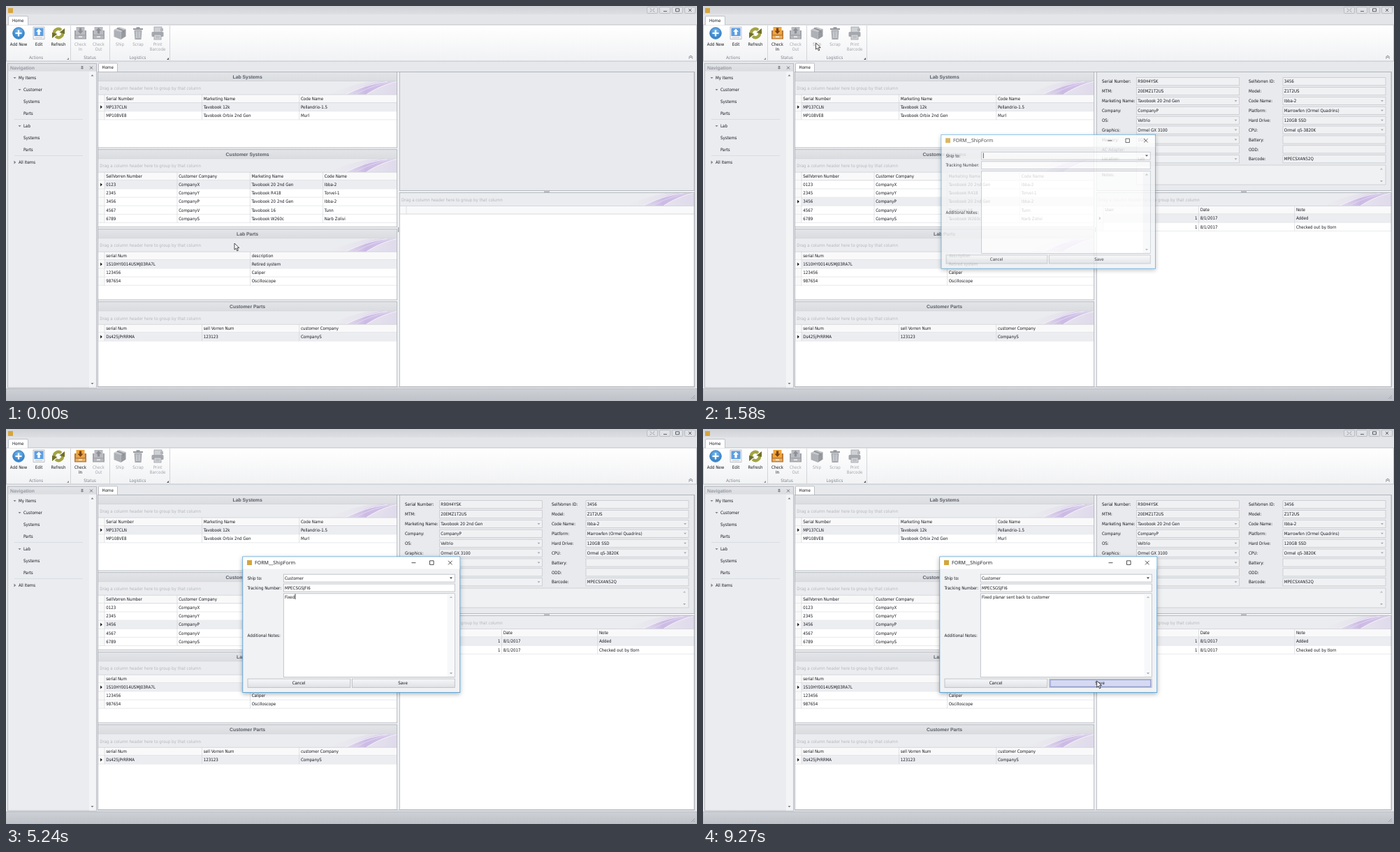
Recreate the animation shown at these times as an HTML page. Size 989x566 px, loop 9.33 s.

```html
<!DOCTYPE html>
<html lang="en">
<head>
<meta charset="utf-8">
<title>Inventory desk</title>
<style>
html, body { margin: 0; width: 100%; height: 100%; overflow: hidden; background: #e6e8ec; }
svg { display: block; width: 100%; height: 100%; }
text { font: 6.15px "DejaVu Sans Condensed", "Liberation Sans", Arial, sans-serif; fill: #16181f; white-space: pre; text-rendering: geometricPrecision; }
.b { font: bold 6.85px "Liberation Sans", Arial, sans-serif; fill: #585c66; }
.faint { fill: #969ba4; }
.dim { fill: #b4b7bd; }
.cap { fill: #7f848d; }
.off { fill: #a3a6ac; }
.mid { text-anchor: middle; }
.end { text-anchor: end; }
.win { font: 7.1px "Open Sans", "Noto Sans", sans-serif; }
</style>
</head>
<body>
<svg id="stage" viewBox="0 0 989 566" preserveAspectRatio="none">
<defs>
  <linearGradient id="bar" x2="0" y2="1"><stop stop-color="#cfd1d6"/><stop offset="1" stop-color="#dddfe3"/></linearGradient>
  <linearGradient id="foot" x2="0" y2="1"><stop stop-color="#cdd0d5"/><stop offset="1" stop-color="#bfc2c8"/></linearGradient>
  <linearGradient id="rib" x2="0" y2="1"><stop stop-color="#fff"/><stop offset="1" stop-color="#f1f2f4"/></linearGradient>
  <linearGradient id="head" x2="0" y2="1"><stop stop-color="#e3e4e8"/><stop offset="1" stop-color="#dadce0"/></linearGradient>
  <linearGradient id="btn" x2="0" y2="1"><stop stop-color="#f6f7f8"/><stop offset="1" stop-color="#dfe1e5"/></linearGradient>
  <linearGradient id="mist"><stop stop-color="#ded6ea" stop-opacity="0"/><stop offset="1" stop-color="#dcd4ea"/></linearGradient>
  <linearGradient id="wisp"><stop stop-color="#d9cdea" stop-opacity=".4"/><stop offset=".4" stop-color="#cbbae4"/><stop offset="1" stop-color="#d5cae8"/></linearGradient>
  <radialGradient id="ball" cy=".35"><stop stop-color="#7fc0f2"/><stop offset="1" stop-color="#3b86cb"/></radialGradient>
  <g id="swirl">
    <path d="M-98 18.5C-80 11-62 4-40 0H0V18.5Z" fill="url(#mist)" opacity=".75"/>
    <path d="M-74 18.5C-58 11-44 4-22 0H0C-18 4-32 11-44 18.5Z" fill="url(#wisp)"/>
    <path d="M-74 18.5C-56 10-38 3-14 0M-44 18.5C-32 11-18 4 0 0" fill="none" stroke="#f6f3fa" stroke-width="1"/>
    <path d="M-60 18.5C-46 11-30 4-6 0" fill="none" stroke="#e6def2" stroke-width=".8"/>
  </g>
  <filter id="shade" x="-10%" y="-10%" width="120%" height="125%"><feDropShadow dx="0" dy="2" stdDeviation="3" flood-opacity=".3"/></filter>
</defs>
</svg>
<script>
const LOOP = 9330, ROW = 12.15, EDGE = '#a9adb4';
const stage = document.getElementById('stage');
const $ = id => document.getElementById(id);

// drawing helpers; text is placed by its vertical centre
const text = (x, y, s, c = '', id = '') => `<text x="${x}" y="${y + 2.2}" class="${c}" id="${id}">${s}</text>`;
const box = (x, y, r, b, fill, line = 'none', more = '') =>
  `<rect x="${x}" y="${y}" width="${r - x}" height="${b - y}" fill="${fill}" stroke="${line}" stroke-width=".8" ${more}/>`;
const path = (d, line = '#888c94', w = .7, fill = 'none') => `<path d="${d}" stroke="${line}" stroke-width="${w}" fill="${fill}"/>`;
const solid = (d, fill) => path(d, 'none', 0, fill);
const layer = (id, s, more = '') => `<g id="${id}" ${more}>${s}</g>`;
const down = (x, y, c = '#a5a9b0') => solid(`M${x - 2} ${y - 1}h4l-2 2.2z`, c);
const up = (x, y, c = '#b5b9bf') => solid(`M${x - 2} ${y + 1}h4l-2-2.2z`, c);
const right = (x, y, c = '#111') => solid(`M${x - 1} ${y - 2.5}v5l2.7-2.5z`, c);

function windowFrame() {
  let s = box(0, 0, 989, 12, 'url(#bar)') + box(3, 3, 10, 10, '#d4a63c') + box(0, 12, 989, 27, '#e3e5e9');
  [917.5, 935.5, 953.5, 971.5].forEach(x => s += box(x, 1.5, x + 15, 10.5, '#dfe1e5', '#b4b7bd', 'rx="1.5"'));
  s += path('M922 3.5l2 2M928 3.5l-2 2M922 8.5l2-2M928 8.5l-2-2', '#5b6068');
  s += path('M941 7.6h5M958.5 3.8h5v4h-5zM977 3.8l4 4.2M981 3.8l-4 4.2', '#4c515a', .9);
  s += box(.5, 27, 988.5, 79, 'url(#rib)', '#b3b6bc');
  s += path('M3.5 27.2V16q0-1.5 1.5-1.5h25q1.5 0 1.5 1.5v11.2', '#b3b6bc', .8, '#fff') + text(9, 20.8, 'Home');
  s += path('M92.5 28v50M148.5 28v50M234.5 28v50', '#c9ccd1', .8);
  s += text(43, 74, 'Actions', 'cap mid') + text(120, 74, 'Status', 'cap mid') + text(188.5, 74, 'Logistics', 'cap mid');
  s += solid('M90 74v3h-3z', '#8a8e96') + solid('M233 74v3h-3z', '#4c515a');
  s += path('M977 73.5l3-2.5 3 2.5M977 75.5l3-2.5 3 2.5', '#6c717a', .8);
  s += box(0, 548.5, 989, 566, 'url(#foot)', '#b3b6bc');
  return s + path('M981 563l5-5M984 563l2-2', '#8f939b');
}

// ribbon pictures, drawn around 0,0
const pics = {
  add: () => '<circle r="8.3" fill="url(#ball)" stroke="#3a7fc0" stroke-width=".9"/>' + path('M-4.5 0h9M0-4.5v9', '#fff', 2.2),
  edit: () => box(-8, -9, 8, 8.5, '#f2f3f5', '#b4b8be') + box(-6.5, -7.5, 6.5, 4, '#5b9ee2') + solid('M0-6.5l4 4.3h-2.3v4.7h-3.4v-4.7h-2.3z', '#fff') +
    path('M-5 6.2H5', '#c3c7cd', 1),
  refresh: () => path('M-6 1A6 6 0 0 1 4-4.5M6-1A6 6 0 0 1-4 4.5', '#a3a443', 4.2) + solid('M1.5-1l7.5-6v8zM-1.5 1L-9 7v-8z', '#6f7128'),
  tray: (on, out) => box(-6, -9, 6, 2, on ? '#f0a53a' : '#b9bbc0') + solid('M-8.5-4h2.5V2h12v-6h2.5V8.5h-17z', on ? '#b8793a' : '#a1a4aa') +
    box(-7, 3.5, 7, 7.2, on ? '#e9b263' : '#b7b9be') + path('M-2.5 5.2h5', '#f7f4ee', 1.4) +
    solid(out ? 'M0-8l4 4.5h-2.4v4h-3.2v-4h-2.4z' : 'M0 1l4-4.5h-2.4v-4h-3.2v4h-2.4z', on ? '#7a431a' : '#8d9097'),
  ship: on => solid('M-8.5-5L-1-9l9.5 3-7 4z', on ? '#f3c05f' : '#c4c6ca') + solid('M-8.5-5L1.5-2v11l-10-4z', on ? '#dd9430' : '#adb0b5') +
    solid('M1.5-2l7-4v10.5l-7 4.5z', on ? '#b8701f' : '#979aa0') + path('M-4-7.2L5-3.8v3', on ? '#6c7487' : '#8b8e94', 1.5),
  scrap: on => solid('M-5.5-4.5h11L4.5 9h-9z', on ? '#566b92' : '#a6a9ae') + solid('M-7-7h4.5v-1.8h5V-7H7v2H-7z', on ? '#3d4f73' : '#96999f') +
    path('M-2.7-3l.4 10M0-3V7M2.7-3l-.4 10', '#e8ebf0', .9),
  print: on => box(-5, -9, 6, -1, on ? '#edf2f8' : '#cfd1d4', '#9ba0a8') + box(-8.5, -2, 8.5, 5, on ? '#4f5a6d' : '#a5a8ad', 'none', 'rx="1.5"') +
    box(-5, 2, 5, 9, on ? '#fff' : '#d3d5d8', '#989ca4') + path('M-3 4.5h6M-3 6.5h6', on ? '#3f84c8' : '#adb0b5', 1) + box(4, -7, 8, -3, on ? '#3f8fd2' : '#b2b5ba')
};
function tool(x, lines, pic, on = true, out = false) {
  return `<g transform="translate(${x} 39)">${pics[pic](on, out)}</g>` +
    lines.map((s, i) => text(x, 54.3 + i * 7.3, s, on ? 'mid' : 'mid off')).join('');
}
const checkIn = on => tool(106.5, ['Check', 'In'], 'tray', on);
const logistics = on => tool(163, ['Ship'], 'ship', on) + tool(189, ['Scrap'], 'scrap', on) + tool(217, ['Print', 'Barcode'], 'print', on);
const tools = () => tool(18, ['Add New'], 'add') + tool(47, ['Edit'], 'edit') + tool(75, ['Refresh'], 'refresh') +
  tool(132.5, ['Check', 'Out'], 'tray', false, true) +
  layer('inOff', checkIn(false)) + layer('inOn', checkIn(true)) + layer('logOff', logistics(false)) + layer('logOn', logistics(true));

function navigation() {
  let s = box(2.5, 82.5, 129.5, 547, '#eaecf0', '#aeb1b8') + box(3, 83, 129, 93.5, 'url(#head)') + text(6, 88.7, 'Navigation', 'b faint');
  s += path('M107.5 86.5h3M109 86.5v4M107 89h4M120 86.5l4 4M124 86.5l-4 4', '#666b74', .9);
  s += box(119, 94, 129, 546.5, '#f3f4f6') + up(123.5, 99.5, '#777c85') + down(123.5, 541, '#777c85');
  const items = [[18, 103, 'My Items', 1], [25, 120, 'Customer', 1], [25, 136.8, 'Systems'], [25, 153.5, 'Parts'],
    [25, 172, 'Lab', 1], [25, 188.8, 'Systems'], [25, 205.5, 'Parts'], [18, 224, 'All Items', 2]];
  for (const [x, y, label, mark] of items) {
    s += text(x, y, label);
    if (mark == 1) s += down(x - 5.5, y, '#7d828b');
    if (mark == 2) s += right(x - 5.5, y, '#7d828b');
  }
  return s + path('M12 162.5h98M12 214.5h98', '#d3d6db');
}

function grid(g) {
  const { x, y, r, b, cols, heads, rows, title, key } = g;
  const top = y + (title ? 13.5 : 0), hd = top + 19, body = hd + 11.6;
  const end = body + rows.length * ROW;
  let s = box(x, y, r, b, '#fff');
  if (title) s += box(x, y, r, top, 'url(#head)') + text((x + r) / 2, y + 6.8, title, 'b mid') + path(`M${x} ${top}H${r}`, '#c3c6cc');
  s += box(x, top, r, hd, '#ebecef') + `<use href="#swirl" x="${r}" y="${top + .3}"/>`;
  s += text(x + 2.7, top + 10, 'Drag a column header here to group by that column', 'dim');
  s += box(x, hd, r, body, '#f9f9fa') + path(`M${x} ${hd}H${r}M${x} ${body}H${r}`, '#c9ccd2');
  s += box(x, body, x + 9.5, end, '#f9f9fa');
  if (rows.length) s += layer(key, box(x + 9.5, body + .4, r, body + ROW - .4, '#ecedf1') + right(x + 4.6, body + ROW / 2));
  rows.forEach((row, i) => {
    const cy = body + ROW * (i + .5), line = body + ROW * (i + 1);
    s += path(`M${x} ${line}H${r}`, '#d8dade', .6);
    row.forEach((v, j) => s += v === 1 ? text(cols[j + 1] - 2, cy, v, 'end') : text(cols[j] + 2.2, cy, v));
  });
  cols.forEach(c => s += path(`M${c} ${hd}V${end}`, '#cdd0d6', .6));
  heads.forEach((h, j) => s += text(cols[j] + 2.2, hd + 5.6, h));
  return s + box(x, y, r, b, 'none', EDGE);
}
const L = { x: 131.5, r: 559.7 }, R = { x: 563.3, r: 985, y: 267.5, b: 545.5 };
const grids = () => grid({ ...L, y: 94.5, b: 203, key: 's1', title: 'Lab Systems', cols: [141, 280.5, 419.7],
    heads: ['Serial Number', 'Marketing Name', 'Code Name'],
    rows: [['MP137CLN', 'Tavobook 12k', 'Pellandrio-1.5'], ['MP108VE8', 'Tavobook Orbix 2nd Gen', 'Murl']] }) +
  grid({ ...L, y: 205.7, b: 316.7, key: 'pick', title: 'Customer Systems', cols: [141, 245, 349.3, 453.6],
    heads: ['SellVorren Number', 'Customer Company', 'Marketing Name', 'Code Name'],
    rows: [['0123', 'CompanyX', 'Tavobook 20 2nd Gen', 'Ibba-2'], ['2345', 'CompanyY', 'Tavobook R418', 'Torvel-1'],
      ['3456', 'CompanyP', 'Tavobook 20 2nd Gen', 'Ibba-2'], ['4567', 'CompanyV', 'Tavobook 16', 'Tunn'],
      ['6789', 'CompanyS', 'Tavobook W260c', 'Narb Zolivi']] }) +
  grid({ ...L, y: 319.7, b: 421, key: 's3', title: 'Lab Parts', cols: [141, 349.5], heads: ['serial Num', 'description'],
    rows: [['1S10HY0014USMJ03RA7L', 'Retired system'], ['123456', 'Caliper'], ['987654', 'Oscilloscope']] }) +
  grid({ ...L, y: 423.8, b: 545.5, key: 's4', title: 'Customer Parts', cols: [141, 280.5, 419.7],
    heads: ['serial Num', 'sell Vorren Num', 'customer Company'], rows: [['Ds425jPrRRMA', '123123', 'CompanyS']] }) +
  layer('blank', grid({ ...R, cols: [573], heads: [], rows: [] }));

function details() {
  const fields = [['Serial Number:', 'R90H4YSK', 'SellVorren ID:', '3456'], ['MTM:', '20EMZ1T2US', 'Model:', 'Z1T2US'],
    ['Marketing Name:', 'Tavobook 20 2nd Gen', 'Code Name:', 'Ibba-2'], ['Company:', 'CompanyP', 'Platform:', 'Marrowfen (Ormel Quadrins)'],
    ['OS:', 'Veltrio', 'Hard Drive:', '120GB SSD'], ['Graphics:', 'Ormel GX 3100', 'CPU:', 'Ormel q5-3820K'],
    ['Memory:', '1GB', 'Battery:', ''], ['AC Adapter:', '', 'ODD:', ''], ['Location:', 'Lab', 'Barcode:', 'MPECSXAN52Q']];
  const drops = ['Marketing Name:', 'OS:', 'Graphics:', 'Memory:', 'Location:', 'Code Name:', 'Platform:', 'Hard Drive:', 'CPU:'];
  const field = (x, fx, y, label, v) => text(x, y, label) + box(fx, y - 5.6, fx + 147, y + 5.6, '#f0f1f3', '#c6c9ce') +
    text(fx + 1.8, y, v) + (drops.includes(label) ? down(fx + 142, y) : '');
  let s = '';
  fields.forEach(([a, av, b, bv], i) => {
    const y = 108.2 + 13.88 * i;
    s += field(571, 620.5, y, a, av) + field(781, 830, y, b, bv);
  });
  s += text(571, 242, 'Notes:') + box(620.5, 228, 977, 256, '#f0f1f3', '#c6c9ce') + up(971, 233.5) + down(971, 251);
  return s + grid({ ...R, key: 's5', cols: [573, 709.5, 846.7], heads: ['User', 'Date', 'Note'],
    rows: [[1, '8/1/2017', 'Added'], [1, '8/1/2017', 'Checked out by tlorn']] });
}

const caret = (id, x, y) => layer(id, path(`M${x} ${y - 3.8}v7.6`, '#111', .8));
function dialog() {
  let s = box(338.8, 183, 649.8, 377.6, '#f1f2f4', '#3f98d6', 'filter="url(#shade)"') + box(339.3, 183.5, 649.3, 200.5, '#fff');
  s += box(345, 188, 352, 195, '#d4a63c') + text(356, 191.9, 'FORM__ShipForm', 'win');
  s += path('M580.5 191.7h6M606.5 188.8h5.6v5.6h-5.6zM633 188.8l5.6 5.6M638.6 188.8l-5.6 5.6', '#222', .8);
  const line = '#b4b8bf';
  s += text(345.5, 213.6, 'Ship to:') + box(397.3, 208.2, 642.3, 219.2, '#fff', line) + down(637, 213.6, '#333');
  s += text(345.5, 227.5, 'Tracking Number:') + box(397.3, 222, 642.3, 233, '#fff', line);
  s += text(345.5, 296, 'Additional Notes:') + box(397.3, 235.8, 642.3, 355.5, '#fff', line) + box(631.5, 236.3, 641.8, 355, '#f7f8f9') + up(637, 241) + down(637, 350);
  s += box(346, 358, 492.8, 370.3, 'url(#btn)', line) + text(419, 364.2, 'Cancel', 'mid');
  s += box(495.4, 358, 642.3, 370.3, 'url(#btn)', line);
  s += layer('hover', box(496.2, 358.6, 641.4, 369.7, '#e9ebf6', '#b5bce0'));
  s += layer('press', box(497, 359.2, 640.8, 369.2, '#d5daf1', '#6373b9'));
  s += text(568, 364.2, 'Save', 'mid');
  s += text(399, 213.6, 'Customer', '', 'dest') + text(399, 227.5, 'MPECSGSJFI6', '', 'track') + text(399, 240.4, '', '', 'note');
  s += caret('c1', 400, 213.4) + caret('c2', 400, 227.3) + caret('c3', 399.7, 240.2);
  return s + layer('list', box(397.4, 219.6, 643, 296.4, '#fff', EDGE) + layer('item', box(398, 220.3, 642.5, 232, '#dfe3f5')) +
    text(399, 226.3, 'Customer') + text(399, 238.3, 'Lab') + box(398, 287, 642.5, 296, '#eceef1') + path('M637 295l4-4M639.5 295l1.5-1.5'));
}

const ARROW = 'M0 0v9.2l2.2-2 1.6 3.7 1.6-.7-1.6-3.6h3z';
stage.insertAdjacentHTML('beforeend',
  windowFrame() + tools() + navigation() +
  box(131.5, 94.5, 985.5, 546, '#f1f2f4', EDGE) +
  path('M132.5 94.7V83q0-1 1-1h25q1 0 1 1v11.7', '#aeb1b8', .8, '#fff') + text(137.5, 88.2, 'Home') +
  box(563.3, 94.5, 985, 264.6, '#e9eaed', EDGE) + path('M770 266.1h8M561.6 317v7', '#9a9ea6', 1.2) +
  grids() + layer('info', details()) +
  layer('cell', box(245.3, 274.3, 349, 286, 'none', '#8d99c8')) +
  layer('filter', solid('M274 130h5l-2 2.3v2.2l-1-.8v-1.4z', '#7d85a5')) +
  layer('form', dialog()) +
  layer('arrow', path(ARROW, '#222', .8, '#fff')) +
  layer('beam', path('M-2-4q2 0 2 1 0-1 2-1M0-3v7M-2 4.6q2 0 2-1 0 1 2 1', '#111', .9)));

const show = (id, on) => $(id).setAttribute('display', on ? 'inline' : 'none');
const within = (t, ...spans) => spans.some(([a, b]) => t >= a && t < b);
const last = (table, t) => table.filter(k => k[0] <= t).pop();

// time, x, y, shape (a = arrow, i = beam, - = hidden)
const moves = [[0, 327, 340, 'a'], [80, 327, 340, 'a'], [420, 312, 281, 'a'], [560, 312, 281, 'a'], [950, 192, 133, 'a'], [1030, 192, 133, 'a'],
  [1330, 161.5, 53, 'a'], [1700, 161.5, 53, 'a'], [1950, 311, 183, 'a'], [2030, 311, 183, 'a'], [2120, 425, 212, 'i'], [2400, 425, 212, 'i'],
  [3050, 630.5, 214.5, 'i'], [3130, 636, 214, 'i'], [3240, 636, 214, 'a'], [3500, 636, 214, 'a'], [3780, 597.5, 229, 'a'], [3820, 597.5, 229, 'i'],
  [4240, 597.5, 229, 'i'], [4490, 561, 253, 'i'], [4570, 561, 253, '-'], [7780, 561, 252, 'i'], [7860, 560, 250, 'i'], [8080, 560, 250, 'i'],
  [8720, 562, 355, 'a'], [9020, 565, 361, 'a'], [9100, 563.7, 361, 'a']];
const NOTE = 'Fixed planar sent back to customer';
const typed = [[0, 0], [4790, 1], [4940, 2], [5020, 3], [5100, 4], [5240, 5], [5320, 6], [5390, 7], [5470, 8], [5540, 10], [5620, 11], [5850, 12],
  [6080, 13], [6160, 14], [6250, 15], [6330, 16], [6410, 18], [6520, 20], [6590, 21], [6670, 22], [6750, 23], [6820, 25],
  [7120, 27], [7200, 29], [7290, 30], [7370, 32], [7450, 34]];
const opening = [[0, 0, 1], [1500, .5, .96], [1580, .81, .986], [1660, 1, 1]];

function pointer(t) {
  const i = moves.indexOf(last(moves, t)), a = moves[i], b = moves[i + 1] || a;
  const u = b === a ? 0 : (t - a[0]) / (b[0] - a[0]), e = u * u * (3 - 2 * u);
  const at = `translate(${a[1] + (b[1] - a[1]) * e} ${a[2] + (b[2] - a[2]) * e})`;
  [['arrow', 'a'], ['beam', 'i']].forEach(([id, shape]) => {
    show(id, a[3] === shape);
    $(id).setAttribute('transform', at);
  });
}

function render(t) {
  const picked = t >= 500, busy = t >= 1430, ready = picked && !busy;
  show('inOn', picked); show('inOff', !picked);
  show('logOn', ready); show('logOff', !ready);
  show('info', picked); show('blank', !picked);
  show('cell', ready);
  show('filter', within(t, [860, 1050]));
  $('pick').setAttribute('transform', `translate(0 ${picked ? 2 * ROW : 0})`);
  $('pick').firstChild.setAttribute('fill', ready ? '#e2e7f9' : '#ecedf1');

  const [, alpha, scale] = last(opening, t);
  show('form', alpha > 0);
  $('form').setAttribute('opacity', alpha);
  $('form').setAttribute('transform', `translate(494.3 280.3) scale(${scale}) translate(-494.3 -280.3)`);
  show('list', within(t, [3280, 3800]));
  show('item', t >= 3540);
  show('dest', t >= 3800);
  show('track', t >= 4250);
  $('note').textContent = NOTE.slice(0, last(typed, t)[1]);
  show('c1', within(t, [1500, 2450], [2950, 3280]));
  show('c2', within(t, [3890, 4250]));
  show('c3', within(t, [4570, 7780], [8180, 8640], [9000, 9270]));
  $('c3').setAttribute('transform', `translate(${alpha ? $('note').getComputedTextLength() : 0} 0)`);
  show('hover', within(t, [8800, 9270]));
  show('press', t >= 9270);
  pointer(t);
}

function tick() {
  render(performance.now() % LOOP);
  requestAnimationFrame(tick);
}
tick();
</script>
</body>
</html>
```
